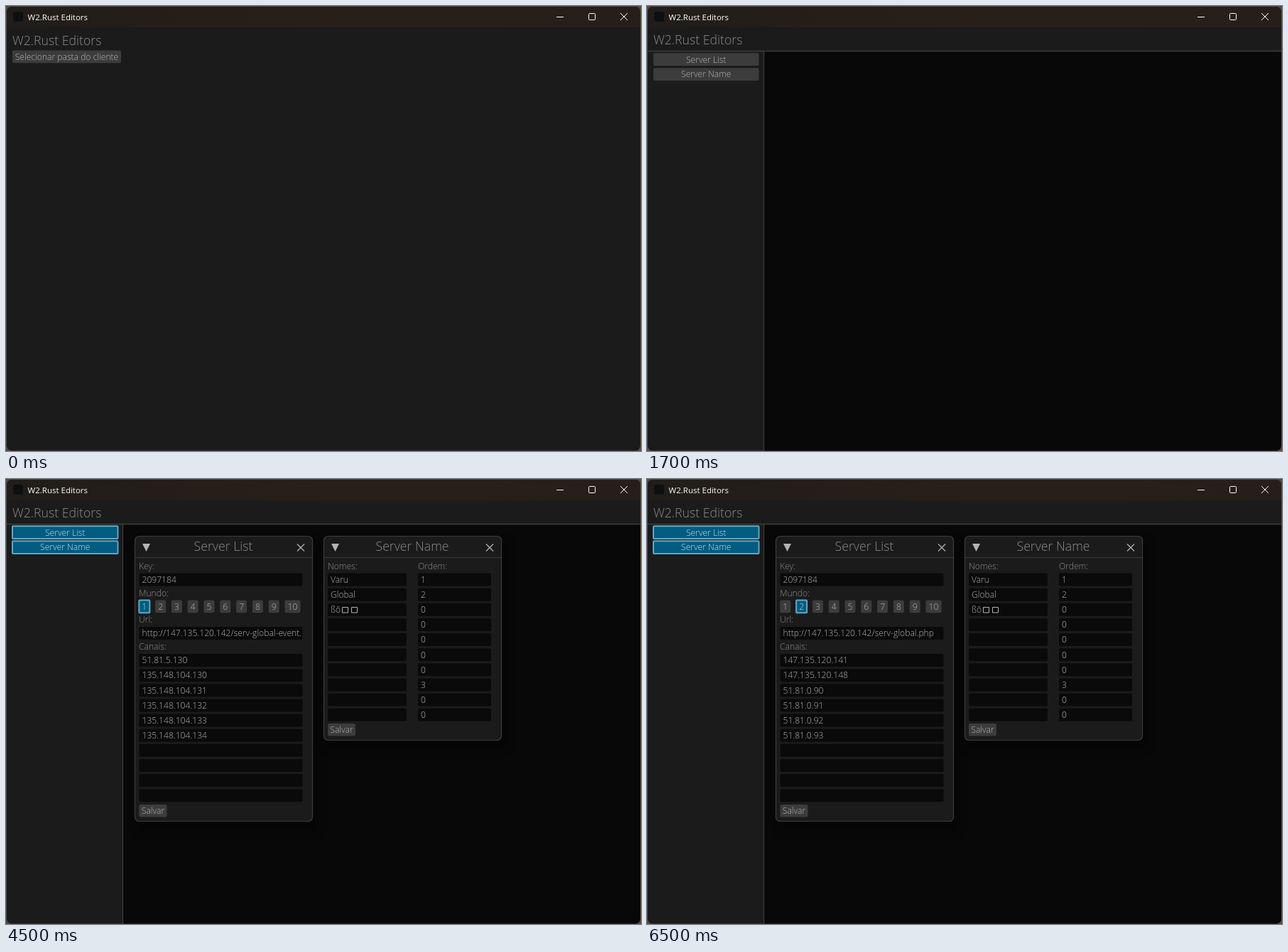
Animation, 894 px wide and 626 px high, one loop 8 s. Source, as an HTML page with a canvas:

```html
<!DOCTYPE html>
<html lang="pt">
<head>
<meta charset="utf-8">
<title>W2.Rust Editors</title>
<style>
html, body { margin: 0; width: 100%; height: 100%; overflow: hidden; background: #1b1b1b; }
canvas { display: block; width: 894px; height: 626px; }
</style>
</head>
<body>
<canvas id="stage" width="894" height="626"></canvas>
<script>
const g = document.getElementById('stage').getContext('2d');
const LOOP = 8000;
const PANEL = '#1b1b1b', DARK = '#080808', FIELD = '#0a0a0a', LINE = '#3c3c3c';
const DIM = '#8c8c8c', LIGHT = '#b4b4b4', SELECTED = '#005c80', RING = '#65a6c5', PALE = '#c0deff';
const ROW = 21.14;

function box(x, y, w, h, fill, r = 2, stroke, lw = 1) {
  g.beginPath();
  g.roundRect(x, y, w, h, r);
  if (fill) { g.fillStyle = fill; g.fill(); }
  if (stroke) { g.strokeStyle = stroke; g.lineWidth = lw; g.stroke(); }
}

function line(color, lw, ...p) {
  g.strokeStyle = color;
  g.lineWidth = lw;
  g.beginPath();
  for (let i = 0; i < p.length; i += 4) {
    g.moveTo(p[i], p[i + 1]);
    g.lineTo(p[i + 2], p[i + 3]);
  }
  g.stroke();
}

// y is the middle of the capital letters
function text(s, x, y, color = DIM, size = 12.1, align = 'left', weight = 300) {
  g.font = `${weight} ${size}px "Open Sans", "Noto Sans", sans-serif`;
  g.textAlign = align;
  g.fillStyle = color;
  g.fillText(s, x, y + size * 0.36);
}

function button(s, x, y, w, h, on) {
  if (on) box(x, y, w, h, SELECTED, 1, RING, 2);
  else box(x, y, w, h, LINE);
  text(s, x + w / 2, y + h / 2, on ? PALE : LIGHT, 12.1, 'center');
}

function field(s, x, y, w) {
  box(x, y - 9, w, 18, FIELD);
  g.save();
  g.beginPath();
  g.rect(x, y - 9, w - 2.5, 18);
  g.clip();
  text(s, x + 4, y, LIGHT);
  g.restore();
}

function cross(x, y, color, lw) {
  line(color, lw, x - 5, y - 5, x + 5, y + 5, x - 5, y + 5, x + 5, y - 5);
}

function frame() {
  g.fillStyle = '#57483b';
  g.fillRect(0, 0, 894, 626);
  g.save();
  g.beginPath();
  g.roundRect(1, 1, 892, 624.5, 7);
  g.clip();
  g.fillStyle = PANEL;
  g.fillRect(0, 0, 894, 626);
  const bar = g.createLinearGradient(0, 0, 894, 0);
  bar.addColorStop(0, '#211d19');
  bar.addColorStop(0.5, '#281f19');
  bar.addColorStop(1, '#261f19');
  g.fillStyle = bar;
  g.fillRect(0, 0, 894, 30);
  g.restore();
  box(10, 8, 14, 14, '#0d1012', 3);
  text('W2.Rust Editors', 30.5, 15.5, '#fff', 11.5, 'left', 400);
  line('#fff', 1, 775, 15.5, 785, 15.5);
  box(820.5, 10.5, 9, 9, null, 1, '#fff');
  cross(870, 15, '#fff', 1);
}

function panels(listOn, nameOn) {
  g.save();
  g.beginPath();
  g.roundRect(1, 1, 892, 624.5, 7);
  g.clip();
  g.fillStyle = DARK;
  g.fillRect(165, 64, 729, 562);
  line(LINE, 1.3, 1, 63.5, 893, 63.5, 164.5, 64, 164.5, 626);
  g.restore();
  button('Server List', 9, 66.3, 148.5, 17.7, listOn);
  button('Server Name', 9, 87.2, 148.5, 17.7, nameOn);
}

function dialog(title, x, h) {
  g.save();
  g.shadowColor = 'rgba(0,0,0,.38)';
  g.shadowBlur = 15;
  g.shadowOffsetX = 6;
  g.shadowOffsetY = 10;
  box(x + .5, 80.5, 250, h, PANEL, 6);
  g.restore();
  box(x + .5, 80.5, 250, h, null, 6, LINE, 1.2);
  line(LINE, 1.2, x + 1, 110.5, x + 250, 110.5);
  g.fillStyle = LIGHT;
  g.beginPath();
  g.moveTo(x + 11, 91);
  g.lineTo(x + 22, 91);
  g.lineTo(x + 16.5, 102);
  g.fill();
  text(title, x + 125, 94.5, DIM, 17.7, 'center');
  cross(x + 234, 96.5, LIGHT, 1.2);
}

function serverList(world) {
  const first = world === 1;
  const url = 'http://147.135.120.142/serv-global' + (first ? '-event.php' : '.php');
  const hosts = first
    ? ['51.81.5.130', ...[0, 1, 2, 3, 4].map(i => '135.148.104.13' + i)]
    : ['147.135.120.141', '147.135.120.148', ...[0, 1, 2, 3].map(i => '51.81.0.9' + i)];
  dialog('Server List', 181, 401);
  text('Key:', 187, 123);
  field('2097184', 187.5, 141.5, 230);
  text('Mundo:', 187, 160.5);
  for (let n = 1; n <= 10; n++) {
    button(n, 187.3 + (n - 1) * 22.8, 170.5, n < 10 ? 15 : 22, 17.7, n === world);
  }
  text('Url:', 187, 198);
  field(url, 187.5, 217, 230);
  text('Canais:', 187, 236);
  for (let i = 0; i < 10; i++) field(hosts[i] || '', 187.5, 255 + i * ROW, 230);
  button('Salvar', 187.5, 458, 39, 17.5);
}

function serverName() {
  const names = ['Varu', 'Global', 'ßõ'];
  const order = [1, 2, 0, 0, 0, 0, 0, 3, 0, 0];
  dialog('Server Name', 447, 287);
  text('Nomes:', 453, 123);
  text('Ordem:', 580, 123);
  order.forEach((n, i) => {
    const y = 141.5 + i * ROW;
    field(names[i] || '', 453, y, 111);
    field(n, 580, y, 103);
  });
  for (const x of [473.5, 486.5]) box(x, 180.5, 8, 7.5, null, 0, LIGHT);
  button('Salvar', 453, 344, 39, 17.5);
}

function draw() {
  const t = performance.now() % LOOP;
  const listOn = t >= 2500, nameOn = t >= 4500;
  frame();
  text('W2.Rust Editors', 9, t < 500 ? 48.5 : 47.5, DIM, 17.7);
  if (t < 500) {
    button('Selecionar pasta do cliente', 9, 62.5, 153, 17.7);
  } else {
    panels(listOn, nameOn);
    if (listOn) serverList(t < 6500 ? 1 : 2);
    if (nameOn) serverName();
  }
  requestAnimationFrame(draw);
}
draw();
</script>
</body>
</html>
```
